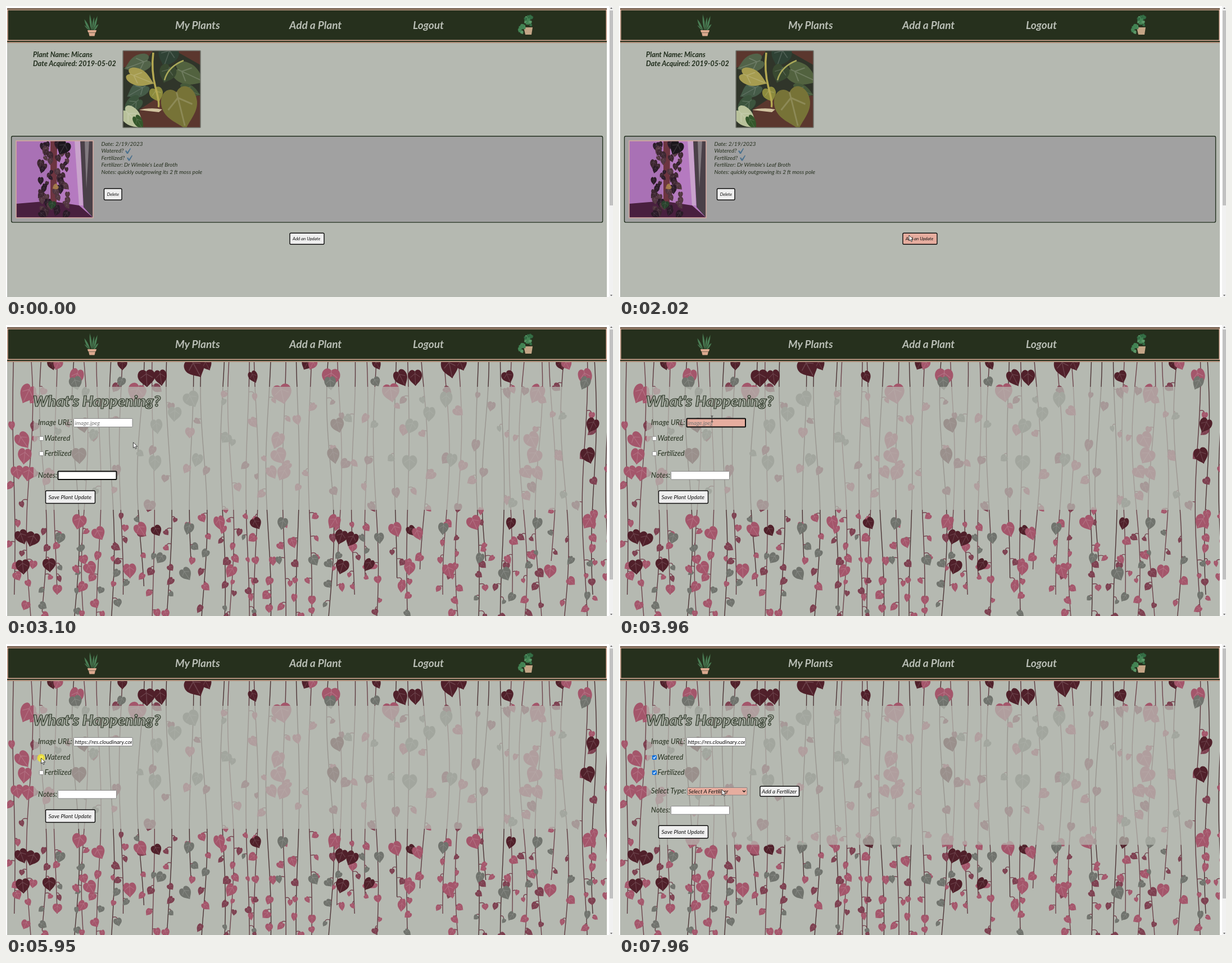
An HTML page for the animation above (8 s loop, 1080 by 518 pixels).

```html
<!DOCTYPE html>
<html lang="en">
<head>
<meta charset="utf-8">
<title>Plant journal</title>
<style>
  html, body { margin: 0; width: 100%; height: 100%; overflow: hidden; background: #fff; }
  svg { display: block; }
  text { font: italic 10px Lato, "Open Sans", sans-serif; fill: #26301f; white-space: pre; }
  .nav { font-size: 19px; font-weight: bold; fill: #b9beb5; }
  .name { font-size: 12.5px; font-weight: bold; fill: #1f2c1b; }
  .label { font-size: 12.8px; }
  .small { font-size: 7.9px; fill: #111; }
  .ink { fill: #111; }
  .title { font-size: 27px; font-weight: 900; fill: #a2a89d; stroke: #2b3526; stroke-width: 1.2; }
  .btn { fill: #efefef; stroke: #0c0c0c; stroke-width: 1.4; }
  .field { fill: #fff; stroke: #858585; }
  .field.focus { stroke: #0c0c0c; stroke-width: 2; }
  .hover { fill: #e6ad9f; }
  .box { fill: #fff; stroke: #777; stroke-width: .8; }
  .on .box { fill: #0b6fdc; stroke: #0b6fdc; }
  .tick { fill: none; stroke: #fff; stroke-width: 1.3; visibility: hidden; }
  .on .tick { visibility: visible; }
</style>
</head>
<body>
<svg width="1080" height="518" viewBox="0 0 1080 518">
  <defs>
    <g id="leaf">
      <path d="M0-.8C.4-1.3 1.1-.9 1-.1C.9.5.3.8 0 1.2C-.3.8-.9.5-1-.1C-1.1-.9-.4-1.3 0-.8Z"/>
      <path d="M0-.8V1M0-.5L.7 0M0-.5L-.7 0" fill="none" stroke="#fff" stroke-opacity=".16" stroke-width=".09"/>
    </g>
    <path id="check" d="M0 5L2 4L4 7L9 0L10 1L5 10H3Z" fill="#4d728e"/>
  </defs>
  <rect x="2" width="1067" y="4" height="514" fill="#b5b9b1"/>

  <g id="list">
    <text class="name" x="48" y="91">Plant Name: Micans</text>
    <text class="name" x="48" y="107">Date Acquired: 2019-05-02</text>
    <svg x="208" y="79" width="138" height="138" viewBox="208 79 138 138">
      <rect x="208" y="79" width="138" height="138" fill="#30352a"/>
      <path d="M208 79H262L250 95L208 110ZM300 79H346V105ZM238 184L290 150L346 160V217H238Z" fill="#5b372e"/>
      <g id="foliage"></g>
      <path d="M262 83Q258 115 266 145T271 180" fill="none" stroke="#b5a952" stroke-width="3.5"/>
      <path d="M282 132Q288 108 316 97" fill="none" stroke="#aaa95a" stroke-width="2.5"/>
      <path d="M237 185Q258 180 278 184L272 189Z" fill="#d2c3a0"/>
    </svg>
    <rect x="208" y="79.5" width="138" height="137" rx="1" fill="none" stroke="#74776f" stroke-width="1.6"/>

    <rect x="9.6" y="231.7" width="1052" height="153.4" rx="2.5" fill="#a1a1a1" stroke="#22301f" stroke-width="1.4"/>
    <svg x="18" y="240" width="137" height="137" viewBox="18 240 137 137">
      <rect x="18" y="240" width="137" height="137" fill="#b57ac0"/>
      <path d="M18 240H78V360H18Z" fill="#a971b5"/>
      <path d="M18 352L78 347L130 355L155 377H18Z" fill="#49203f"/>
      <path d="M122 240H132L137 355H130Z" fill="#c9a3cc"/>
      <path d="M132 240H155V377L138 358Z" fill="#4a4048"/>
      <path d="M140 240H148L143 325Z" fill="#827a80"/>
      <path d="M79 240H91L90 350H79Z" fill="#6d3540"/>
      <g id="climber"></g>
    </svg>
    <rect x="18" y="240" width="137" height="137" fill="none" stroke="#d3a9a0" stroke-width="1.6"/>
    <text x="169.5" y="248.5">Date: 2/19/2023</text>
    <text x="169.5" y="261">Watered?</text>
    <text x="169.5" y="273.5">Fertilized?</text>
    <text x="169.5" y="286">Fertilizer: Dr Wimble's Leaf Broth</text>
    <text x="169.5" y="298.5">Notes: quickly outgrowing its 2 ft moss pole</text>
    <use href="#check" x="212" y="253"/>
    <use href="#check" x="215" y="265.5"/>
    <rect class="btn" x="174.5" y="325" width="31.5" height="20.3" rx="2"/>
    <text class="small" x="179.7" y="338">Delete</text>
    <rect class="btn" id="update" x="505" y="404.3" width="61" height="20" rx="2"/>
    <text class="small" x="510" y="417">Add an Update</text>
  </g>

  <g id="form">
    <svg x="2" y="65" width="1067" height="453" viewBox="2 65 1067 453"><g id="vines"></g></svg>
    <rect id="panel" x="49" y="110" width="972" height="219" fill="#b5b9b1" fill-opacity=".73"/>
    <text class="title" x="48" y="145">What's Happening?</text>
    <text class="label" x="57" y="178">Image URL:</text>
    <rect class="field" id="url" x="120.5" y="166.5" width="104.5" height="15" rx="1"/>
    <svg x="121" y="167" width="103" height="14" viewBox="121 167 103 14">
      <text id="address" x="122.5" y="177.5"></text>
    </svg>
    <g id="watered">
      <rect class="box" x="59.4" y="198.4" width="7.2" height="7.2" rx="1"/>
      <path class="tick" d="M60.8 202L62.4 203.7L65.4 200"/>
      <text class="label" x="68.5" y="206">Watered</text>
    </g>
    <g id="fertilized">
      <rect class="box" x="59.4" y="225.4" width="7.2" height="7.2" rx="1"/>
      <path class="tick" d="M60.8 229L62.4 230.7L65.4 227"/>
      <text class="label" x="68.5" y="233">Fertilized</text>
    </g>
    <g id="type">
      <text class="label" x="57" y="266">Select Type:</text>
      <rect class="field" id="select" x="121.5" y="255.5" width="106.5" height="13.5" rx="1"/>
      <text class="ink" x="123.5" y="265.7">Select A Fertilizer</text>
      <path d="M220 260.8L222.5 263.3L225 260.8" fill="none" stroke="#111" stroke-width="1.3"/>
      <rect class="btn" x="251" y="253.2" width="69.5" height="18" rx="2"/>
      <text class="ink" x="254" y="265.7">Add a Fertilizer</text>
    </g>
    <g id="rest">
      <text class="label" x="57" y="271.5">Notes:</text>
      <rect class="field" id="notes" x="92.5" y="260.5" width="104" height="14.5" rx="1"/>
      <rect class="btn" x="70.5" y="295" width="88" height="22.5" rx="2"/>
      <text class="ink" x="75.5" y="309.7">Save Plant Update</text>
    </g>
    <path id="caret" d="M0 0V12" stroke="#111"/>
  </g>

  <rect x="2" y="4" width="1067" height="62" fill="#26301d"/>
  <path d="M2 6.8H1069M2 61.3H1069M2 65H1069M3 6V62M1068.2 6V62" stroke="#dfb09c" stroke-width="1.5"/>
  <path d="M2 4.6H1069" stroke="#8a5c4b"/>
  <text class="nav" x="301" y="41">My Plants</text>
  <text class="nav" x="504" y="41">Add a Plant</text>
  <text class="nav" x="724" y="41">Logout</text>
  <path d="M152 43Q147 30 149 14Q154 28 153 43ZM150 43Q146 30 139 23Q141 37 149 43ZM154 43Q157 27 163 17Q162 34 156 43ZM150 43Q145 36 139 34Q143 41 149 44ZM155 43Q159 34 165 32Q162 40 157 44ZM153 42Q153 26 157 19Q158 32 155 43Z" fill="#4b8057" stroke="#26301d" stroke-width=".5"/>
  <path d="M145 43H161L160 47H146ZM147 47.5H159L157.5 53.5H148.5Z" fill="#dba98f"/>
  <path d="M921 38H937L935 51H924Z" fill="#c3a586"/>
  <path d="M920 39Q912 38 914 47" fill="none" stroke="#3d774a" stroke-width="1.5"/>
  <g id="potted"></g>

  <path d="M1073 0H1080V518H1073Z" fill="#f1f1f1"/>
  <path d="M1075 5L1077 2.5L1079 5ZM1075 514L1077 516.5L1079 514Z" fill="#606060"/>
  <rect id="thumb" x="1074" y="8" width="6" fill="#c1c1c1"/>

  <g id="pointer">
    <circle id="click" r="7" fill="#f3e52a" fill-opacity=".8"/>
    <path id="arrow" d="M0 0V10L2.4 7.9L4 11.6L5.7 10.8L4.1 7.3H7.3Z" fill="#fff" stroke="#111" stroke-width=".8"/>
    <path id="beam" d="M-2-5H2M0-5V5M-2 5H2" stroke="#333" stroke-width=".9"/>
  </g>
</svg>
<script>
const $ = id => document.getElementById(id);
const show = (id, on) => { $(id).style.display = on ? '' : 'none'; };
const mark = (id, name, on) => $(id).classList.toggle(name, on);

let seed = 11;
const rand = (lo, hi) => {
  seed = (seed * 16807) % 2147483647;
  return lo + (hi - lo) * seed / 2147483647;
};
const pick = list => list[Math.floor(rand(0, list.length))];
const leaf = (x, y, size, turn, fill, wide = 1) =>
  `<use href="#leaf" fill="${fill}" transform="translate(${x} ${y}) rotate(${turn}) scale(${size * wide} ${size})"/>`;

const DARK = '#50202a', PINK = '#a4566b', GREY = '#70736d', DUSK = '#7d4050';

function drawVines() {
  const stems = [14, 42, 66, 88, 124, 140, 165, 188, 205, 240, 262, 290, 330, 352, 386, 400, 430, 445];
  // x, y, size of the larger leaves
  const large = [
    [DARK, [82, 70, 9, 207, 70, 9, 250, 94, 14, 275, 93, 13, 337, 75, 17, 357, 70, 10, 440, 92, 10,
      137, 178, 12, 130, 232, 13, 445, 353, 10, 268, 366, 9, 28, 377, 12, 47, 381, 12, 30, 430, 12, 77, 427, 11]],
    [PINK, [125, 93, 15, 92, 70, 9, 38, 122, 16, 30, 205, 14, 33, 233, 13, 20, 262, 11, 40, 264, 12, 232, 120, 15,
      130, 350, 12, 240, 364, 12, 380, 352, 12, 165, 371, 11, 150, 433, 11, 220, 437, 12, 400, 438, 11, 510, 387, 9, 136, 466, 9]],
    [GREY, [205, 101, 8, 124, 103, 11, 330, 132, 13, 300, 158, 12, 268, 180, 12, 265, 245, 13, 340, 240, 11,
      325, 362, 10, 492, 353, 10, 96, 379, 9, 320, 443, 11, 548, 419, 9, 275, 415, 9]]
  ];
  let lines = '', leaves = '';
  for (let shift = 0; shift < 1070; shift += 453) {
    for (const base of stems) {
      const x0 = base + shift, sway = rand(2, 7), phase = rand(0, 6), end = rand(420, 620);
      const at = y => x0 + sway * Math.sin(y / 75 + phase);
      let d = `M${at(60)} 60`;
      for (let y = 75; y < end; y += 15) d += `L${at(y).toFixed(1)} ${y}`;
      lines += `<path d="${d}" stroke="${pick(['#5d3a40', '#6d444c', '#4b3234'])}"/>`;
      for (let y = rand(110, 190); y < Math.min(end, 525);) {
        const low = y > 330, side = rand(-11, 11), x = at(y) + side, top = y - rand(3, 9);
        lines += `<path d="M${at(top)} ${top}Q${x} ${top - 3} ${x} ${y}" stroke="#74434f"/>`;
        leaves += leaf(x, y, low ? rand(4, 8) : rand(5, 10), rand(-60, 60),
          pick([PINK, PINK, DUSK, GREY, low ? PINK : DUSK]), rand(.7, 1.1));
        y += low ? rand(17, 42) : rand(50, 130);
      }
    }
  }
  for (const [fill, p] of large)
    for (let i = 0; i < p.length; i += 3)
      for (let x = p[i]; x < 1085; x += p[i + 1] > 370 ? 568 : 453)
        leaves += leaf(x, p[i + 1], p[i + 2], rand(-35, 35), fill, rand(.8, 1.1));
  $('vines').innerHTML = `<g fill="none" stroke-width="1.4">${lines}</g>${leaves}`;
}

function drawPhotos() {
  $('foliage').innerHTML = [
    [288, 88, 18, 20, '#2f4235'], [235, 103, 22, 70, '#526349', .7], [325, 122, 27, -65, '#52623f', .7],
    [287, 120, 15, 20, '#394931'], [235, 150, 19, 60, '#455b48', .7], [326, 151, 18, -70, '#46593a', .6],
    [238, 128, 23, -68, '#a69c50', .65], [225, 176, 18, 50, '#3c543d', .7], [268, 157, 12, -20, '#8c8b3d'],
    [225, 199, 22, -45, '#b9c29b', .7], [236, 207, 13, -30, '#34572b', .6], [310, 180, 34, -14, '#777337', .93]
  ].map(p => leaf(...p)).join('');

  let climber = '';
  for (let y = 246; y < 372; y += 5)
    for (const side of [-1, 1])
      climber += leaf(85 + side * rand(4, 25), y, rand(4, 8), rand(-50, 50), pick(['#2b1b28', '#3d2631', '#51353f']), .8);
  climber += leaf(102, 252, 12, 30, '#1d171d') + leaf(82, 354, 7, 10, '#29412c') + leaf(88, 322, 5, 60, '#a17848');
  $('climber').innerHTML = climber;

  let potted = '';
  for (let i = 0; i < 16; i++)
    potted += leaf(rand(917, 935), rand(18, 39), rand(2.5, 4.5), rand(-60, 60), pick(['#3f8050', '#2f6840', '#569363']));
  $('potted').innerHTML = potted + leaf(914, 43, 3.5, 20, '#3f8050') + leaf(918, 47, 3, -30, '#569363');
}

// time, x, y
const path = [
  [320, 1066, 130], [620, 900, 430], [800, 700, 495], [1060, 411, 345], [1130, 411, 345],
  [1630, 516, 408], [2550, 516, 408], [3300, 165.5, 167], [4810, 165.5, 167], [5140, 84, 207],
  [5280, 84, 207], [5810, 62.5, 203], [6100, 62.5, 203], [6370, 60.5, 227], [7560, 60.5, 227], [7960, 183, 259]
];
const clicks = [[1830, 2020], [3430, 3560], [5950, 6100], [6970, 7170]];

function pointerAt(t) {
  const next = path.findIndex(p => p[0] > t);
  if (next < 0) return path[path.length - 1].slice(1);
  if (!next) return path[0].slice(1);
  const [t0, x0, y0] = path[next - 1], [t1, x1, y1] = path[next];
  const u = (t - t0) / (t1 - t0), k = t < 1060 ? u : u * u * (3 - 2 * u);
  return [x0 + (x1 - x0) * k, y0 + (y1 - y0) * k];
}

function draw(t) {
  const [x, y] = pointerAt(t);
  const over = (l, top, r, b) => t >= 320 && x >= l && x <= r && y >= top && y <= b;
  const form = t >= 2090, typing = form && t < 5950, inUrl = t >= 3430;
  const pasted = t >= 4490, more = t >= 7170;

  show('list', !form);
  show('form', form);
  $('thumb').setAttribute('height', form ? 445 : 347);
  mark('update', 'hover', over(505, 404, 566, 425));

  const overUrl = form && over(120, 165, 225, 182);
  mark('url', 'hover', overUrl);
  mark('url', 'focus', typing && inUrl);
  mark('notes', 'focus', typing && !inUrl);
  $('address').textContent = pasted ? 'https://res.cloudinary.com' : 'image.jpeg';
  $('address').style.fill = pasted ? '#111' : '#777';

  const since = t - (inUrl ? 3430 : 2090);
  show('caret', typing && Math.floor(since / 530) % 2 === 0);
  $('caret').setAttribute('transform', `translate(${!inUrl ? 94.5 : pasted ? 223 : 122.5} ${inUrl ? 168 : 262})`);

  mark('watered', 'on', t >= 6100);
  mark('fertilized', 'on', more);
  show('type', more);
  mark('select', 'hover', more && over(121, 255, 228, 269));
  $('rest').setAttribute('transform', `translate(0 ${more ? 28.2 : 0})`);
  $('panel').setAttribute('height', more ? 247.5 : 219);

  show('pointer', t >= 320);
  show('arrow', !overUrl);
  show('beam', overUrl);
  show('click', clicks.some(([a, b]) => t >= a && t < b));
  $('pointer').setAttribute('transform', `translate(${x} ${y})`);
}

function tick() {
  draw(performance.now() % 8000);
  requestAnimationFrame(tick);
}

drawVines();
drawPhotos();
tick();
</script>
</body>
</html>
```
